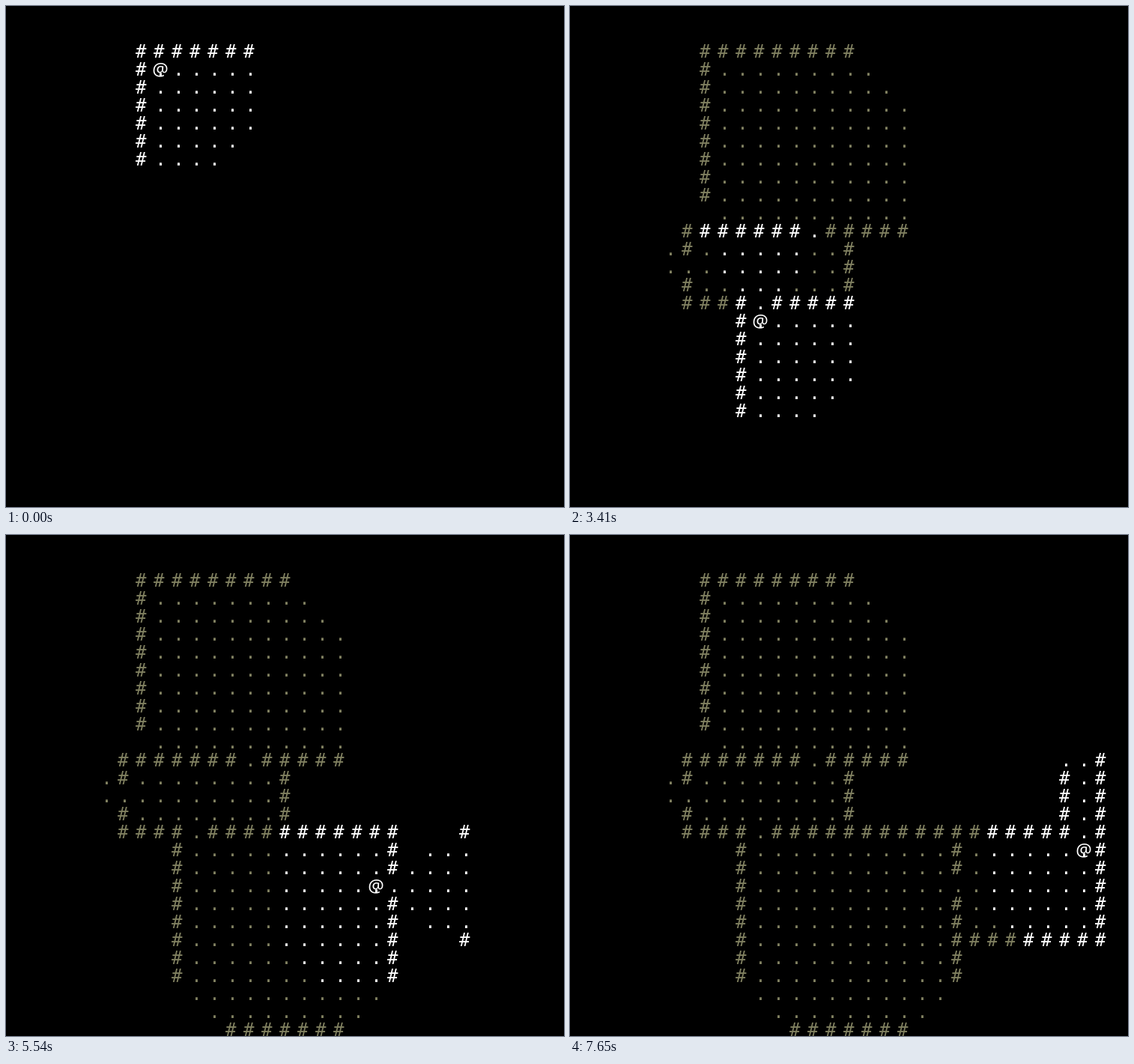
An HTML page with a canvas for the animation above (8 s loop, 745 px wide and 669 px high).

```html
<!DOCTYPE html>
<html lang="en">
<head>
<meta charset="utf-8">
<title>Dungeon walk</title>
<style>
  html, body { margin: 0; width: 100%; height: 100%; overflow: hidden; background: #000; }
  canvas { display: block; }
</style>
</head>
<body>
<canvas id="stage" width="745" height="669"></canvas>
<script>
const LOOP = 8000, CELL = 24, COLS = 32, RADIUS = 6;
const LIT = '#fff', SEEN = '#808060';
const canvas = document.getElementById('stage');
const ctx = canvas.getContext('2d');

const floor = new Set();
const id = (x, y) => y * COLS + x;

function dig(left, top, width = 1, height = 1) {
  for (let y = top; y < top + height; y++) {
    for (let x = left; x < left + width; x++) floor.add(id(x, y));
  }
}

// Rooms, then passages; the doors are dug by walking through them.
dig(8, 3, 12, 9);
dig(7, 13, 8, 3);
dig(10, 17, 11, 10);
dig(22, 17, 7, 5);
dig(5, 14, 2);
dig(5, 13);
dig(28, 12, 1, 5);
dig(27, 12);

const moves = { E: [1, 0], S: [0, 1], '↗': [1, -1], '↘': [1, 1], '↙': [-1, 1] };

// Walks one burst of evenly timed steps.
const path = [{ time: 0, x: 8, y: 3 }];
function walk(start, end, steps) {
  [...steps].forEach((step, i) => {
    const from = path[path.length - 1];
    const [dx, dy] = moves[step];
    const time = start + (end - start) * i / Math.max(1, steps.length - 1);
    path.push({ time, x: from.x + dx, y: from.y + dy });
  });
}
walk(360, 1160, '↘↘↘↘↘');
walk(1480, 2080, 'SSSS');
walk(2480, 3110, '↙↙↙S');
walk(3410, 4360, 'S↘↘↘↘↘');
walk(4590, 4990, '↗↗↗');
walk(5310, 5540, 'EE');
walk(5940, 5940, 'E');
walk(6240, 7180, 'EEEEE');
walk(7480, 7650, '↗↗');
path.forEach(p => dig(p.x, p.y));

const roundAway = v => Math.sign(v) * Math.round(Math.abs(v));

// Shadow casting over four quadrants; returns the set of visible cells.
function fieldOfView(px, py) {
  const visible = new Set([id(px, py)]);

  function scan(place, depth, low, high) {
    if (depth >= RADIUS) return;
    const last = roundAway(depth * high);
    let before = null;
    for (let c = roundAway(depth * low); c <= last; c++) {
      const cell = place(depth, c);
      const open = floor.has(cell);
      const edge = (2 * c - 1) / (2 * depth);
      if (Math.hypot(depth, c) < RADIUS) visible.add(cell);
      if (before === false && open) low = edge;
      if (before === true && !open) scan(place, depth + 1, low, edge);
      before = open;
    }
    if (before) scan(place, depth + 1, low, high);
  }

  for (const side of [-1, 1]) {
    scan((d, c) => id(px + c, py + side * d), 1, -1, 1);
    scan((d, c) => id(px + side * d, py + c), 1, -1, 1);
  }
  return visible;
}

// Everything once lit stays on the map.
let known = new Set();
for (const p of path) {
  p.lit = fieldOfView(p.x, p.y);
  p.seen = known = new Set([...known, ...p.lit]);
}

// Font and horizontal centre of each glyph inside its cell.
const glyphs = {
  '#': { font: '24px "DejaVu Sans Mono", monospace', centre: 12.2 },
  '.': { font: '24px "DejaVu Sans Mono", monospace', centre: 14.5 },
  '@': { font: '24px "Noto Sans", sans-serif', centre: 14 }
};

function put(ch, x, y, colour) {
  const { font, centre } = glyphs[ch];
  ctx.font = font;
  ctx.fillStyle = colour;
  ctx.fillText(ch, x * CELL + centre, y * CELL + 21);
}

function draw(p) {
  ctx.clearRect(0, 0, canvas.width, canvas.height);
  ctx.textAlign = 'center';
  for (const cell of p.seen) {
    put(floor.has(cell) ? '.' : '#', cell % COLS, Math.floor(cell / COLS), p.lit.has(cell) ? LIT : SEEN);
  }
  put('@', p.x, p.y, LIT);
}

let shown = null;
function tick() {
  const t = performance.now() % LOOP;
  const now = path.findLast(p => p.time <= t);
  if (now !== shown) draw(shown = now);
  requestAnimationFrame(tick);
}
tick();
</script>
</body>
</html>
```
